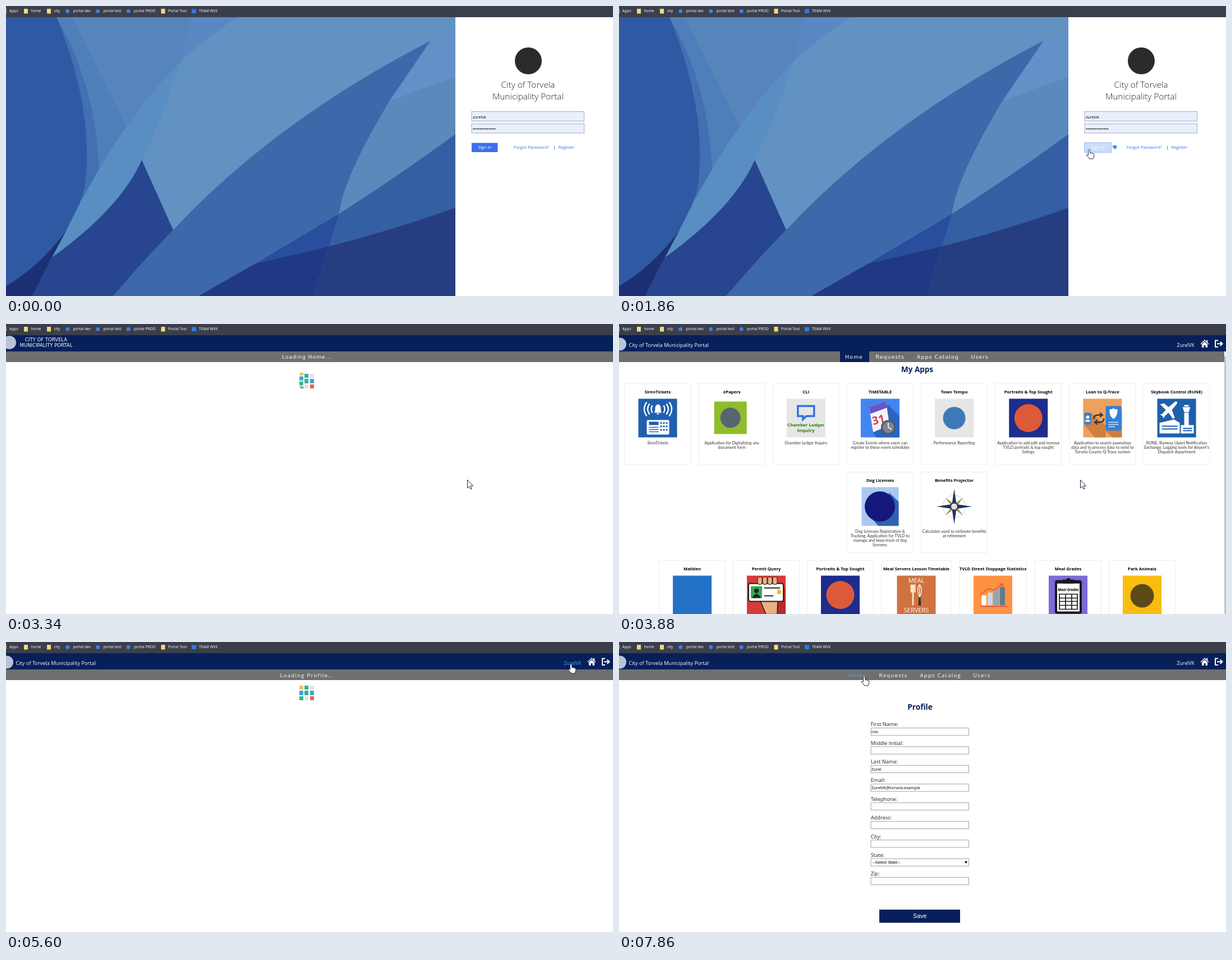
Write an HTML page that moves like this. It is 1082 px wide and 518 px high and loops after 8 s.

```html
<!DOCTYPE html>
<html lang="en">
<head>
<meta charset="utf-8">
<title>Portal sign-in</title>
<style>
html, body { margin: 0; width: 100%; height: 100%; overflow: hidden; background: #fff; }
#stage { position: relative; width: 1082px; height: 518px; overflow: hidden; }
svg { display: block; }
text { font-family: "Open Sans", sans-serif; white-space: pre; }
.wide { font-family: "DejaVu Sans", sans-serif; }
.arial { font-family: "Liberation Sans", sans-serif; }
.desc { font-family: Lato, sans-serif; }
.mid { text-anchor: middle; }
.bold { font-weight: 700; }
.nav text { fill: #fff; }
.thin { letter-spacing: 1.25px; }

/* Scenes: hard cuts on one shared 8 s clock */
.scene { opacity: 0; }
.scene, .hover { animation: 8s step-end infinite; }
#login { animation-name: login; }
#pressed { animation-name: pressed; }
#drop { animation-name: drop; }
#portal { animation-name: portal; }
#plainHead { animation-name: plainHead; }
#fullHead { animation-name: fullHead; }
.loadHome { animation-name: loadHome; }
#apps { animation-name: apps; }
#cards { animation-name: cards; }
.loadProfile { animation-name: loadProfile; }
#profile { animation-name: profile; }
@keyframes login { 0% { opacity: 1 } 24.375% { opacity: 0 } }
@keyframes pressed { 8% { opacity: 1 } 24.375% { opacity: 0 } }
@keyframes drop { 14.6% { opacity: 1 } 24.375% { opacity: 0 } }
@keyframes portal { 24.375% { opacity: 1 } }
@keyframes plainHead { 24.375% { opacity: 1 } 46.5% { opacity: 0 } }
@keyframes fullHead { 46.5% { opacity: 1 } }
@keyframes loadHome { 25.1% { opacity: 1 } 46.5% { opacity: 0 } }
@keyframes apps { 46.5% { opacity: 1 } 69% { opacity: 0 } }
@keyframes cards { 47.5% { opacity: 1 } 69% { opacity: 0 } }
@keyframes loadProfile { 69% { opacity: 1 } 79.75% { opacity: 0 } }
@keyframes profile { 79.75% { opacity: 1 } }

#user { fill: #fff; animation-name: userHover; }
#requests { animation-name: requestsHover; }
#home { animation-name: homeHover; }
@keyframes userHover { 61.25% { fill: #3aa5f5 } 79.75% { fill: #fff } }
@keyframes requestsHover { 91.3% { fill: #55a8f2 } 95.1% { fill: #fff } }
@keyframes homeHover { 96.2% { fill: #55a8f2 } }

#orbit { transform-origin: 890px 252px; animation: spin 1s linear -.87s infinite; }
@keyframes spin { to { transform: rotate(360deg) } }

#cursor { animation: travel 8s ease-in-out infinite, seen 8s step-end infinite; opacity: 0; }
#arrow { animation: arrow 8s step-end infinite; }
#hand { animation: hand 8s step-end infinite; }
@keyframes seen { 2% { opacity: 1 } 79.75% { opacity: 0 } 84.5% { opacity: 1 } }
@keyframes arrow {
  0%, 24.375%, 79.75% { opacity: 1 }
  7.9%, 61.25%, 91.3% { opacity: 0 }
}
@keyframes hand {
  0%, 24.375%, 79.75% { opacity: 0 }
  7.9%, 61.25%, 91.3% { opacity: 1 }
}
@keyframes travel {
  0%, 2% { transform: translate(991px, 465px) }
  8.75%, 24.374% { transform: translate(838px, 256px) }
  24.375%, 52.4% { transform: translate(822px, 278px) }
  62.25% { transform: translate(1001px, 43px) }
  64.25%, 79.75% { transform: translate(1007px, 39px) }
  79.76%, 84.5% { transform: translate(594px, 247px) }
  92.25%, 94.1% { transform: translate(495px, 62px) }
  98.25%, 100% { transform: translate(437px, 61px) }
}

/* Cube loader: slices roll one after another */
.cube { position: absolute; left: 523px; width: 26px; height: 26px; perspective: 90px; }
.slice { position: absolute; width: 7.4px; height: 26px; transform-style: preserve-3d;
  transform-origin: 50% 50% -13px; animation: roll 1s ease-in-out infinite; }
.face { position: absolute; inset: 0; backface-visibility: hidden; transform-origin: 50% 50% -13px; }
.face + .face { transform: rotateX(-90deg); }
.face i { display: block; height: 7.4px; margin-bottom: 1.9px; }
@keyframes roll { 0% { transform: none } 25%, 100% { transform: rotateX(90deg) } }
</style>
</head>
<body>
<div id="stage">
<svg width="1082" height="518" viewBox="0 0 1082 518">
  <g id="portal" class="scene">
    <rect y="20" width="1082" height="29" fill="#07205a"/>
    <g id="plainHead" class="scene" fill="#fff">
      <circle cx="6" cy="33" r="12" fill="#b9c3d6"/>
      <text class="wide mid" x="71.5" y="31" font-size="8.5">CITY OF TORVELA</text>
      <text class="wide mid" x="71.5" y="41" font-size="8.5">MUNICIPALITY PORTAL</text>
    </g>
    <g id="fullHead" class="scene" fill="#fff">
      <circle cx="1.5" cy="36" r="11.5" fill="#b9c3d6"/>
      <text x="17.5" y="41" font-size="9.2">City of Torvela Municipality Portal</text>
      <text id="user" class="hover" x="994.5" y="41" font-size="8.7">ZurelVK</text>
      <path d="M1036.5 35.5 1044 28l3 3v-2h2.2v4.200l2.300 2.300-1 1-6.500-6.500-6.500 6.500zM1039 36.500l5-5 5 5V42h-3.500v-4h-3v4h-3.500z"/>
      <path d="M1068 29.500h-5v11.500h5M1066 35.200h8M1071.500 31.500l4 3.700-4 3.700" fill="none" stroke="#fff" stroke-width="2"/>
    </g>
  </g>
  <g class="scene loadHome">
    <rect y="49" width="1082" height="19" fill="#6f6f6f"/>
    <text class="wide mid" x="536.5" y="62.300" font-size="9.2" letter-spacing=".92" fill="#fff">Loading Home...</text>
  </g>
  <g class="scene loadProfile">
    <rect y="49" width="1082" height="19" fill="#6f6f6f"/>
    <text class="mid thin" x="537" y="62.500" font-size="9.6" fill="#fff">Loading Profile...</text>
  </g>
  <g id="apps" class="scene">
    <rect y="49" width="1079" height="19" fill="#6f6f6f"/>
    <rect x="394" y="49" width="52" height="19" fill="#07205a"/>
    <rect x="1079" y="58" width="3" height="460" fill="#c4c4c4"/>
    <g class="nav" font-size="9.4" letter-spacing="1.05">
      <text class="wide" x="403" y="62">Home</text>
      <text class="wide" x="457.500" y="62">Requests</text>
      <text class="wide" x="531" y="62">Apps Catalog</text>
      <text class="wide" x="627.500" y="62">Users</text>
    </g>
    <text class="mid bold" x="531.500" y="85.800" font-size="13.5" fill="#07205a">My Apps</text>
  </g>
  <g id="cards" class="scene"></g>
  <g id="profile" class="scene">
    <rect y="49" width="1082" height="19" fill="#6f6f6f"/>
    <g class="nav thin" font-size="9.6">
      <text id="home" class="hover" x="409" y="62.500">Home</text>
      <text id="requests" class="hover" x="463.500" y="62.500">Requests</text>
      <text x="536.500" y="62.500">Apps Catalog</text>
      <text x="631" y="62.500">Users</text>
    </g>
    <text class="mid bold" x="536.500" y="121" font-size="13.7" fill="#07205a">Profile</text>
    <g id="form"></g>
    <text class="arial" x="452" y="396.300" font-size="7.300">--Select State--</text>
    <path d="M616 391.500h5l-2.500 4.500z"/>
    <rect x="464" y="478" width="144" height="23.500" fill="#07205a"/>
    <text class="arial mid" x="536.300" y="493" font-size="10.800" fill="#fff">Save</text>
  </g>
  <g id="login" class="scene">
    <rect y="20" width="1082" height="498" fill="#fff"/>
    <rect y="20" width="801" height="498" fill="#6292c2"/>
    <path fill="#5a87c4" d="M330 20H413Q355 58 312 98z"/>
    <path fill="#5684bb" d="M118 20H330L312 98Q262 150 216 218z"/>
    <path fill="#4f7fba" d="M90 20H118L216 218 166 298Q162 145 90 20z"/>
    <path fill="#436fb3" d="M90 20Q162 145 166 298L135 347 120 200z"/>
    <path fill="#2f5aa3" d="M0 20H90Q155 180 142 310 138 350 108 400 60 465 0 500z"/>
    <path fill="#598ec2" d="M312 98Q200 210 108 400L82 449Q205 360 242 275 275 210 312 98z"/>
    <path fill="#27468f" d="M242 275 298 400 191 518H47L82 449Q205 360 242 275z"/>
    <path fill="#1d3075" d="M108 400 82 449 47 518H0V500Q60 465 108 400z"/>
    <path fill="#3d69aa" d="M191 518Q243 456 298 400 480 205 757 62L684 169Q600 310 594 371L444 460 343 518z"/>
    <path fill="#6490c8" d="M757 62 801 38V127L684 169z"/>
    <path fill="#5b89bb" d="M684 169 801 127V229Q700 303 594 371 600 310 684 169z"/>
    <path fill="#345fa3" d="M594 371Q700 303 801 229V360Q690 400 576 429z"/>
    <path fill="#284e9d" d="M594 371 576 429 444 460z"/>
    <path fill="#213984" d="M444 460 576 429 549 518H343z"/>
    <path fill="#263d81" d="M576 429Q690 400 801 360V518H549z"/>
    <circle cx="931" cy="98" r="24" fill="#2b2b2b"/>
    <g class="mid" font-size="15.400" font-weight="300" fill="#222">
      <text x="930.500" y="145.500">City of Torvela</text>
      <text x="930.500" y="167">Municipality Portal</text>
    </g>
    <g fill="#e8f0fe" stroke="#a9adb5">
      <rect x="830" y="188.500" width="200.500" height="17"/>
      <rect x="830" y="210.500" width="200.500" height="16.500"/>
    </g>
    <text x="832" y="200.500" font-size="7.200">zurelvk</text>
    <path d="M833.500 219.500h38" stroke="#000" stroke-width="2.200" stroke-linecap="round" stroke-dasharray="0 3.150"/>
    <rect x="830" y="244.500" width="46.500" height="16.500" fill="#3a70ee"/>
    <rect id="pressed" class="scene" x="829.500" y="244" width="48" height="17.500" fill="#cbdcfa" stroke="#9dbdf7"/>
    <g font-size="7.700" fill="#3b72e8">
      <text class="mid" x="853.300" y="255.200" fill="#fff">Sign in</text>
      <text x="904.700" y="255.200">Forgot Password?</text>
      <text x="975.500" y="255.200" fill="#222">|</text>
      <text x="984.500" y="255.200">Register</text>
    </g>
    <g id="drop" class="scene"><g id="orbit">
      <path d="M893 241.500Q896 249 891 249.500 886.500 249 887.500 245 889 242.500 893 241.500z" fill="#3f8ff7"/>
    </g></g>
  </g>
  <rect width="1082" height="20" fill="#3a3f4b"/>
  <g id="bookmarks" font-size="6.700" fill="#fff"></g>
  <g id="cursor" fill="#fff" stroke="#1b2340" stroke-linejoin="round">
    <path id="arrow" d="M.5.500V15l3.300-3 2.200 5 2.300-1-2.200-4.800H10.500z"/>
    <path id="hand" d="M-1.500 2Q0-1 1.500 1.500L2.500 7Q4 5.500 5 7.200 6.500 6.200 7.300 8 9 7.500 9.200 9.500L8.800 13 7.500 17H1L-4.300 11.500Q-5-0+9-2.500 9.200L0 10.500z"/>
  </g>
</svg>
</div>
<script>
const $ = id => document.getElementById(id);
const text = (x, y, s, attrs = '') => `<text x="${x}" y="${y}" ${attrs}>${s.replace(/&/g, '&amp;')}</text>`;
const rect = (x, y, w, h, fill, attrs = '') => `<rect x="${x}" y="${y}" width="${w}" height="${h}" fill="${fill}" ${attrs}/>`;
const circle = (x, y, r, fill, attrs = '') => `<circle cx="${x}" cy="${y}" r="${r}" fill="${fill}" ${attrs}/>`;
const path = (d, fill, attrs = '') => `<path d="${d}" fill="${fill}" ${attrs}/>`;
const line = (d, color, w = 2) => path(d, 'none', `stroke="${color}" stroke-width="${w}"`);
const range = n => [...Array(n).keys()];

$('hand').setAttribute('d', 'M-1.5 1.500Q0-1 1.500 1.500L2 7Q3.500 5.500 4.700 7.200 6.200 6.200 7 8 8.800 7.500 9 9.500L8.500 13 7 17H1L-4.500 11Q-4.500 8.800-2.500 9.500L-1.500 10.500z');

const marks = [['home', 44.5], ['city', 85.5], ['portal dev', 119.5], ['portal test', 173.5],
  ['portal PROD', 228], ['Portal Tool', 289], ['TEAM WVX', 344]];
$('bookmarks').innerHTML = rect(0, 5, 1, 8, '#e9a23b') + text(6, 11.3, 'Apps') + marks.map(([s, x], i) =>
  (i < 2 || i === 5 ? rect(x - 12.5, 5, 7, 8.5, '#f9d978')
    : i < 5 ? circle(x - 9.8, 9.2, 3.5, '#3f7fe8') : rect(x - 13, 5.5, 8, 7.5, '#2f7be0')) + text(x, 11.3, s)).join('');

const badge = rect(0, 0, 69, 69, '#1c2d8c') + circle(34.5, 34.5, 25, '#dd5a38');
const icon = {
  alarm: rect(0, 0, 69, 69, '#1f60ae') +
    path('M28 25Q30 23 30 17 30 11 35 10 40 11 40 17 40 23 42 25zM33 26h4v2h-4z', '#fff') +
    line('M25 12q-4 6 0 13M20 9q-7 9 0 19M15 6q-9 12 0 25M45 12q4 6 0 13M50 9q7 9 0 19M55 6q9 12 0 25', '#fff', 2.3) +
    rect(15, 38, 40, 26, '#fff', 'rx="2"') + rect(19, 41, 17, 6, '#1f60ae') +
    range(9).map(i => rect(39 + i % 3 * 5, 42 + (i / 3 | 0) * 6, 3, 3, '#1f60ae')).join('') +
    line('M19 51h17M19 55h17M19 59h17', '#1f60ae', 1.5),
  papers: rect(3, 5, 58, 58, '#8fbc2b') + circle(32, 34, 18, '#56656f'),
  ledger: rect(0, 0, 69, 69, '#e6e6e6') +
    line('M20 13H49V31H35L29 37V31H20z', '#2f70e0', 3.4) +
    text(34.5, 49.5, 'Chamber Ledger', 'class="wide mid bold" font-size="7.1" fill="#358312"') +
    text(34.5, 59.5, 'Inquiry', 'class="wide mid bold" font-size="7.800" fill="#358312"'),
  calendar: rect(0, 0, 69, 69, '#4285f0') + path('M48 10 69 31V69H28L20 58z', '#2c62c0') +
    path('M15 15 45 4 51 47 22 60z', '#f4f4fa') + path('M15 15 45 4 47 16 17 27z', '#6a55c8') +
    text(22, 47, '31', 'class="bold" font-size="20" fill="#d93a5e" transform="rotate(-14 22 47)"') +
    circle(49, 51, 13, '#555c66') + circle(49, 51, 10, '#7c8794') + line('M49 43v8l6 4', '#fff', 1.6),
  tempo: rect(0, 0, 69, 69, '#e6e6e6') + circle(34.5, 34.5, 20, '#3f78b8'),
  badge,
  loan: rect(0, 0, 69, 69, '#eda15d') + path('M14 25 40 48V69H20L2 46zM62 13 69 20V69H52L40 57z', '#cf7f3c') +
    rect(2, 25, 12, 21, '#3280d8', 'rx="2"') + circle(8, 33, 3, '#fff') + rect(4, 38, 8, 3, '#fff') +
    rect(40, 13, 28, 44, '#3280d8', 'rx="3"') + path('M47 19q7 0 7-3 0 3 7 3 1 12-7 17-8-5-7-17z', '#fff') +
    line('M45 42h18M45 46h18M45 50h12', '#cfe2f8', 1.5) +
    line('M19 36q0-7 8-7h7l-4-4m4 4-4 4M37 35q0 7-8 7h-8l4-4m-4 4 4 4', '#333', 2.3),
  airport: rect(0, 0, 69, 69, '#1d60ab') +
    path('M5 10 12 8 20 15 32 5q5-1 3 4L26 20 31 34 28 36 20 25 13 31 12 35 9 31 5 28 9 27 15 20z', '#fff') +
    path('M45 15h14l-3 9H48zM48 11h8v3H48zM48 25h8V48H48z', '#fff') +
    path('M4 43 30 37 40 43V62H4zM42 47H65V62H42z', '#fff') +
    line('M8 49h28M8 54h28M46 53h16M46 57h16', '#1d60ab', 2),
  dogs: rect(1.5, 0, 66, 69, '#a8c8f2') + path('M51 10 67.500 26V69H31L19 55z', '#2f62ad') + circle(34, 34.5, 27, '#13187a'),
  compass: circle(34.5, 34.5, 20, 'none', 'stroke="#d6cfb5"') +
    range(8).map(i => path(i % 2 ? 'M34.5 12 38 34.500H31z' : 'M34.500 3 38.500 30 34.500 34.500 30.500 30z',
      i % 2 ? '#a8905a' : '#1d3668', `transform="rotate(${i * 45} 34.5 34.5)"`)).join('') +
    circle(34.5, 34.5, 6.5, '#e9e2cc', 'stroke="#1d3668" stroke-width="2"'),
  mail: rect(0, 0, 69, 69, '#2472c8'),
  permit: rect(0, 0, 69, 69, '#d83b38') + path('M23 8 45 2 69 23V69H48L20 45z', '#b32b2b') +
    path('M24 45 32 40H55L54 69H34z', '#e8b184', 'stroke="#222" stroke-width="1.5"') +
    rect(3, 14, 62, 32, '#fff', 'rx="3" stroke="#222" stroke-width="2"') +
    rect(7, 19, 20, 21, '#35a853') + circle(17, 27, 4, '#222') + path('M9 40q8-15 16 0z', '#222') +
    line('M31 22h28M31 36h16', '#222') + rect(54, 25, 7, 8, '#f2bd2e') +
    range(4).map(i => rect(19 + i * 9, 2, 8, 14, '#e8b184', 'rx="4" stroke="#222"')).join(''),
  meals: rect(0, 0, 69, 69, '#d0723f') +
    text(34.5, 12, 'MEAL', 'class="mid" font-size="11" fill="#fff"') +
    text(34.5, 65, 'SERVERS', 'class="mid" font-size="11" fill="#fff"') +
    path('M24 16h9v14h-3v23h-3V30h-3z', '#f6e2c4') + path('M39 38h3l1 15h-5z', '#333') +
    line('M40.500 38q-7-14 0-22 7 8 0 22zM40.500 16v22', '#f4f4f4', 1.3),
  stats: rect(0, 0, 69, 69, '#ff9142') +
    ['#fff', '#cdd9e4', '#8fa6b5', '#5f7b8e'].map((c, i) =>
      rect(14 + i * 11, 35 - i * 5, 9, 18 + i * 5, c, 'rx="2"')).join('') +
    line('M13 55h47M15 31 27 23 36 26 52 15m-5 0h5v5', '#df4b3a', 1.5),
  grades: rect(0, 0, 69, 69, '#7d69d8') + rect(11, 8, 48, 60, '#17171c', 'rx="4"') + rect(15, 14, 40, 50, '#fff') +
    path('M25 7h6q4-6 8 0h6v7H25z', '#17171c') +
    text(35, 27, 'Meal Grades', 'class="mid bold" font-size="6.300" font-style="italic"') +
    line('M19 33h32v27H19zM19 40h32M19 46h32M19 53h32M30 33v27M41 33v27', '#17171c', 1.7),
  park: rect(0, 0, 69, 69, '#f8bd0d') + circle(34.5, 36, 21, '#5b4a17'),
};

const card = (x, y, title, art, desc = [], w = 118) => {
  const cx = x + w / 2;
  return rect(x, y, w, 144, '#fff', 'stroke="#eee"') +
    text(cx, y + 17, title, 'class="mid bold" font-size="7.700"') +
    `<g transform="translate(${cx - 34.5} ${y + 27})">${icon[art]}</g>` +
    desc.map((s, i) => text(cx, y + 108.4 + i * 8, s, 'class="mid desc" font-size="7.250" fill="#333"')).join('');
};
const top8 = [
  ['SirenTickets', 'alarm', ['SirenTickets']],
  ['ePapers', 'papers', ['Application for Digitalizing any', 'document form']],
  ['CLI', 'ledger', ['Chamber Ledger Inquiry']],
  ['TIMETABLE', 'calendar', ['Create Events where users can', 'register to these event schedules']],
  ['Town Tempo', 'tempo', ['Performance Reporting']],
  ['Portraits & Top Sought', 'badge', ['Application to add,edit and remove', 'TVLD portraits & top sought', 'listings']],
  ['Loan to Q-Trace', 'loan', ['Application to search pawnshop', 'data and to process data to send to', 'Torvela County Q-Trace system']],
  ['Skybook Control (RUNE)', 'airport', ['RUNE. Runway Upset Notification', 'Exchange. Logging tools for Airport\'s', 'Dispatch department']],
];
const bottom = [
  [71.5, 'Mailden', 'mail'], [203.5, 'Permit Query', 'permit'], [335.5, 'Portraits & Top Sought', 'badge'],
  [468, 'Meal Servers Lesson Timetable', 'meals', 124], [607.5, 'TVLD Street Stoppage Statistics', 'stats'],
  [741.5, 'Meal Grades', 'grades'], [873.5, 'Park Animals', 'park'],
];
$('cards').innerHTML =
  top8.map((c, i) => card(10 + i * 132.15, 106.5, ...c)).join('') +
  card(406.5, 264.5, 'Dog Licenses', 'dogs', ['Dog Licenses Registration &', 'Tracking. Application for TVLD to', 'manage and keep track of dog', 'licenses.']) +
  card(538.5, 264.5, 'Benefits Projector', 'compass', ['Calculator used to estimate benefits', 'at retirement']) +
  bottom.map(([x, title, art, w]) => card(x, 422.5, title, art, [], w)).join('');

const fields = [['First Name', 'nilo'], ['Middle Initial'], ['Last Name', 'Zurel'],
  ['Email', 'ZurelVK@torvela.example'], ['Telephone'], ['Address'], ['City'], ['State'], ['Zip']];
$('form').innerHTML = fields.map(([label, value = ''], i) => {
  const y = 150.4 + i * 33.35;
  return text(448.7, y, label + ':', 'font-size="9.250" fill="#222"') +
    rect(449, y + 3.2, 174.5, 13.2, '#fff', 'stroke="#a2a2a2"') + text(450, y + 12.5, value, 'font-size="7.250"');
}).join('');

const slices = [['#f0c070', '#3aa9c9', '#33b09a'], ['#33b09a', '#33b09a', '#e3e5e6'], ['#e3e5e6', '#3aa9c9', '#ec5f5a']];
const cube = (scene, top, shift) => `<div class="cube scene ${scene}" style="top:${top}px">` + slices.map((colors, i) => {
  const face = `<div class="face">${colors.map(c => `<i style="background:${c}"></i>`).join('')}</div>`;
  return `<div class="slice" style="left:${i * 9.4}px;animation-delay:${i * 250 - 1000 + shift}ms">${face + face}</div>`;
}).join('') + '</div>';
$('stage').insertAdjacentHTML('beforeend', cube('loadHome', 88.5, 255) + cube('loadProfile', 78, -350));
</script>
</body>
</html>
```
